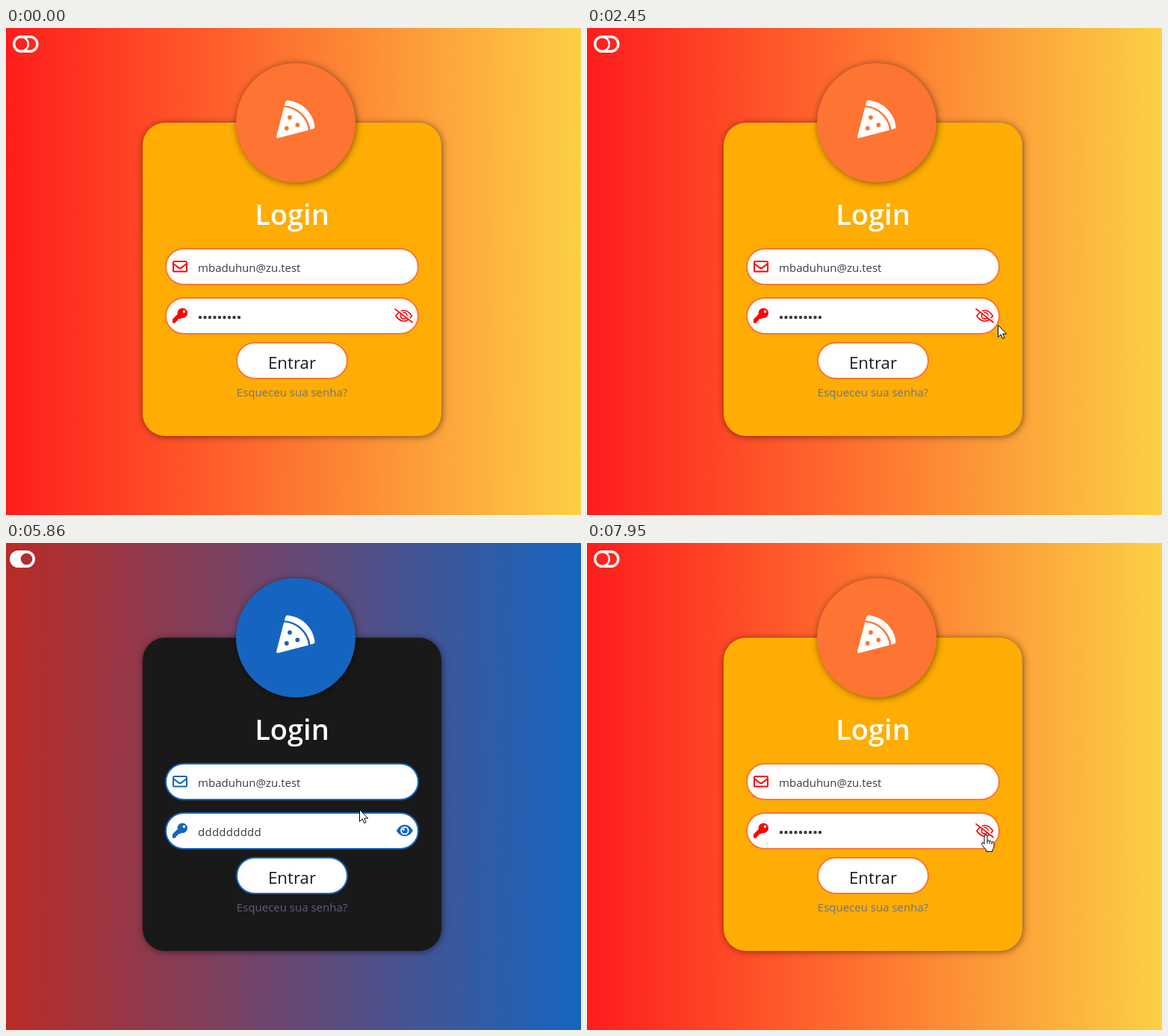
Animation of 770x653 px, one loop 8000 ms. Source, as an HTML page:

```html
<!DOCTYPE html>
<html lang="pt-BR">
<head>
<meta charset="utf-8">
<title>Login</title>
<style>
  :root {
    --left: #ff1c1c; --right: #fcd045; --card: #ffad04; --accent: #fe7433;
    --icon: #f00; --link: #6c757d; --off: 1; --on: 0;
    animation: theme 8s step-end infinite;
  }
  html, body { margin: 0; width: 100%; height: 100%; overflow: hidden; }
  body { background: linear-gradient(to right, var(--left), var(--right)); }
  svg { display: block; width: 770px; height: 653px; }
  text { font-family: "Open Sans", "Noto Sans", sans-serif; }

  .card, .badge { filter: drop-shadow(1px 1px 5px rgba(0, 0, 0, .5)); }
  .card { fill: var(--card); }
  .badge { fill: var(--accent); }
  .title { font-size: 38px; font-weight: 600; fill: #fff; }
  .value { font-size: 15px; fill: #3c3c3c; }
  .secret { letter-spacing: .25px; }
  .enter { font-size: 22.3px; fill: #1c1c1c; }
  .link { font-size: 15px; fill: var(--link); }
  .mid { text-anchor: middle; }
  .edge { fill: none; stroke: var(--accent); stroke-width: 2; }
  .fade { animation: edge 8s ease-in-out infinite; }
  .solid { fill: var(--icon); }
  .line { fill: none; stroke: var(--icon); stroke-width: 1.6; }
  .off { opacity: var(--off); }
  .on { opacity: var(--on); }

  .masked { animation: masked 8s step-end infinite; }
  .shown { animation: shown 8s step-end infinite; }
  .cursor { animation: move 8s ease-in-out infinite; }
  .press { fill: rgba(255, 255, 0, .5); opacity: 0; animation: press 8s step-end infinite; }
  .arrow { animation: arrow 8s step-end infinite; }
  .hand { animation: hand 8s step-end infinite; }
  .cursor path { stroke: #000; stroke-linejoin: round; }

  @keyframes theme {
    16.25%, 63.75% {
      --left: #b92b27; --right: #1565c0; --card: #191919; --accent: #1565c0;
      --icon: #1565c0; --link: #645c78; --off: 0; --on: 1;
    }
    0%, 22%, 85%, 100% {
      --left: #ff1c1c; --right: #fcd045; --card: #ffad04; --accent: #fe7433;
      --icon: #f00; --link: #6c757d; --off: 1; --on: 0;
    }
  }
  /* field borders lag behind the theme by 150 ms */
  @keyframes edge {
    0%, 16.25%, 23.875%, 63.75%, 86.875%, 100% { stroke: #fe7433; }
    18.125%, 22%, 65.625%, 85% { stroke: #1565c0; }
  }
  @keyframes masked {
    0%, 55%, 94.5%, 100% { opacity: 1; }
    34.625%, 69.75% { opacity: 0; }
  }
  @keyframes shown {
    0%, 55%, 94.5%, 100% { opacity: 0; }
    34.625%, 69.75% { opacity: 1; }
  }
  @keyframes press {
    15.25%, 21%, 32.75%, 54.125%, 62.5%, 68.625%, 83.25%, 93.5% { opacity: 1; }
    0%, 17.25%, 22.5%, 34.625%, 56%, 64.75%, 70.5%, 84.75%, 95.5%, 100% { opacity: 0; }
  }
  @keyframes hand {
    12%, 32%, 51.875%, 62%, 68%, 82.25%, 91.75% { opacity: 1; }
    0%, 22.875%, 43.125%, 56.75%, 65%, 71.25%, 84.875% { opacity: 0; }
    100% { opacity: 1; }
  }
  @keyframes arrow {
    0%, 12%, 32%, 51.875%, 62%, 68%, 82.25%, 91.75%, 100% { opacity: 0; }
    .875%, 22.875%, 43.125%, 56.75%, 65%, 71.25%, 84.875% { opacity: 1; }
  }
  @keyframes move {
    0%, .875% { transform: translate(697px, 582px); animation-timing-function: linear; }
    10.5% { transform: translate(113px, 31px); animation-timing-function: ease-out; }
    12.5%, 22.5% { transform: translate(37px, 24px); }
    30.375%, 30.75% { transform: translate(550px, 398px); }
    32.75%, 42.5% { transform: translate(528px, 396px); }
    46.875% { transform: translate(391px, 290px); }
    52.5%, 56.25% { transform: translate(528px, 389px); }
    62.5%, 64.75% { transform: translate(18px, 23px); }
    68.125%, 70.75% { transform: translate(530px, 390px); }
    73.125%, 73.625% { transform: translate(473px, 357px); }
    82.5%, 84.75% { transform: translate(20px, 23px); animation-timing-function: ease-in; }
    85.875%, 86.25% { transform: translate(255px, 135px); animation-timing-function: ease-out; }
    88.75%, 90.625% { transform: translate(505px, 340px); }
    92.5%, 100% { transform: translate(534px, 391px); }
  }
</style>
</head>
<body>
<svg viewBox="0 0 770 653">
  <!-- theme switch -->
  <g fill="#fff" fill-rule="evenodd">
    <path class="off" d="M20.5 10h11.5a11.5 11.5 0 0 1 0 23h-11.5a11.5 11.5 0 0 1 0-23z
      M20.5 13.4a8.1 8.1 0 0 0 0 16.2a8.1 8.1 0 0 0 0-16.2z
      M27.5 13.4h4.5a8.1 8.1 0 0 1 0 16.2h-4.5a11 11 0 0 0 0-16.2z"/>
    <path class="on" d="M16.5 10h11a11.5 11.5 0 0 1 0 23h-11a11.5 11.5 0 0 1 0-23z
      M27.5 13.7a7.8 7.8 0 0 0 0 15.6a7.8 7.8 0 0 0 0-15.6z"/>
  </g>

  <rect class="card" x="183" y="127" width="400" height="420" rx="30"/>
  <circle class="badge" cx="388" cy="127" r="80"/>

  <!-- pizza slice -->
  <g fill="#fff">
    <path d="M374.2 99Q375 96.6 377.5 97A40 40 0 0 1 413.5 132Q413.8 134.6 411.5 135.2L407.6 136.2A38 38 0 0 0 372.8 104z"/>
    <path d="M372.2 106.2A35 35 0 0 1 405 137L364.5 147.4Q361.6 147.8 362.2 145z"/>
  </g>
  <g class="dots" style="fill: var(--accent)">
    <circle cx="380" cy="120" r="2.9"/>
    <circle cx="390.3" cy="130" r="2.9"/>
    <circle cx="375.8" cy="134.5" r="2.9"/>
  </g>

  <text class="title mid" x="383" y="264">Login</text>

  <!-- e-mail -->
  <rect x="214" y="296" width="338" height="48" rx="24" fill="#fff"/>
  <path class="edge" d="M245 296h-7a24 24 0 0 0 0 48h7"/>
  <path class="edge fade" d="M245 296h283a24 24 0 0 1 0 48h-283"/>
  <g class="line" style="stroke-width: 2">
    <rect x="224" y="313" width="18" height="13.5" rx="1.6"/>
    <path d="M224 316l7.4 5.6q1.6 1.2 3.2 0l7.4-5.6"/>
  </g>
  <text class="value" x="257" y="327">mbaduhun@zu.test</text>

  <!-- password -->
  <rect x="214" y="362" width="338" height="48" rx="24" fill="#fff"/>
  <path class="edge" d="M245 362h-7a24 24 0 0 0 0 48h7M521 362h7a24 24 0 0 1 0 48h-7"/>
  <path class="edge fade" d="M245 362h276M245 410h276"/>
  <path class="solid" d="M223 390.5l8-8v7.5l-1 1h-1.5v2.2h-2.3v2.2h-3.2z"/>
  <path class="solid" d="M223 391l8.5-8.5 4.5 5-2.5 2.5h-3.3v2.4h-2.6v2.8h-4.6z"/>
  <circle class="solid" cx="236.3" cy="382.2" r="6.7"/>
  <circle cx="238.4" cy="380.2" r="1.7" fill="#fff"/>

  <g class="masked">
    <path d="M260 388h53" fill="none" stroke="#3c3c3c" stroke-width="4.4"
      stroke-linecap="round" stroke-dasharray="0 6.5"/>
    <path class="line" d="M522 386q4.5-7.3 10.7-7.3t10.7 7.3q-4.5 7-10.7 7t-10.7-7z"/>
    <circle class="line" cx="532.7" cy="385.8" r="4.3"/>
    <path d="M521.5 375.3l24 18.5" stroke="#fff" stroke-width="2"/>
    <path class="line" d="M520.5 376.3l24 18.7"/>
  </g>
  <g class="shown">
    <text class="value secret" x="257" y="393">ddddddddd</text>
    <path class="solid" d="M522.8 385.7q4.4-7.9 11.1-7.9t11.1 7.9q-4.4 7.6-11.1 7.6t-11.1-7.6z"/>
    <circle cx="533.9" cy="385.6" r="5.7" fill="#fff"/>
    <circle class="solid" cx="533.9" cy="385.6" r="3.9"/>
    <circle cx="532.4" cy="384.1" r="1.7" fill="#fff"/>
  </g>

  <rect class="edge" x="309" y="422" width="148" height="48" rx="24" style="fill: #fff"/>
  <text class="enter mid" x="383" y="456.5">Entrar</text>
  <text class="link mid" x="383" y="494">Esqueceu sua senha?</text>

  <g class="cursor">
    <circle class="press" cy="-1" r="13"/>
    <path class="arrow" fill="#fff" d="M.5 .5v16l3.7-3.5 2.4 5.6 2.5-1.1-2.4-5.4h5z"/>
    <g class="hand">
      <path fill="#fff" d="M-2 2q0-1.8 2-1.8t2 1.8v6q2.4-1 3 .8 2.4-.9 3 .9 3-.5 3 2v4.200q0 2.500-2 4.500v2.300h-8.500v-2.300q-3.500-3.400-5.800-7.400-.6-2.600 1.900-2.200l1.400 1.700z"/>
      <path fill="none" d="M2 8v4M5 9v3.500M8 10v3"/>
    </g>
  </g>
</svg>
</body>
</html>
```
